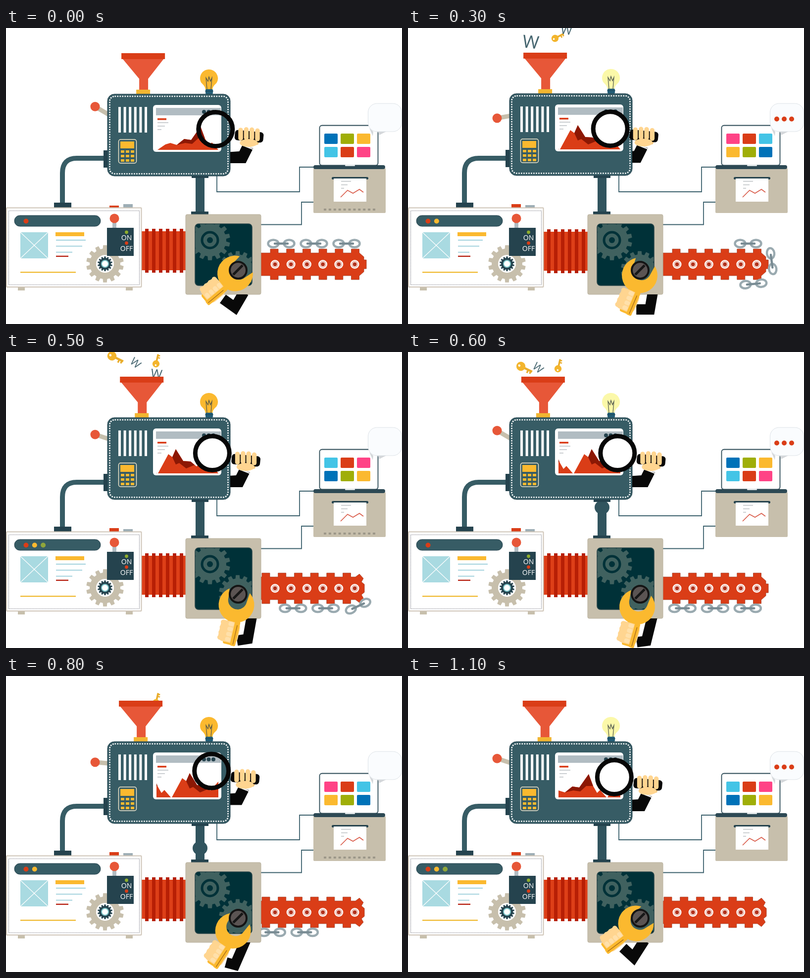
Recreate the animation shown at these times as an HTML page with a canvas. Size 800 by 600 pixels, loop 1.2 s.

```html
<!DOCTYPE html>
<html>
<head>
<meta charset="utf-8">
<style>html,body{margin:0;width:100%;height:100%;overflow:hidden;background:#fff}canvas{display:block}</style>
</head>
<body>
<canvas id="stage" width="800" height="600"></canvas>
<script>
const c = document.getElementById('stage').getContext('2d');
const TEAL = '#375c65', DARK = '#25434e', RED = '#da3d17', ORANGE = '#e75738', GOLD = '#fbb92f',
  BEIGE = '#c7bfac', NIGHT = '#003138', COG = '#40615f', SKIN = '#ffd590', PALE = '#ffe0aa', GREY = '#b1bcc2';

// ---------- drawing helpers ----------
function paint(fill, stroke, width = 1) {
  if (fill) { c.fillStyle = fill; c.fill(); }
  if (stroke) { c.strokeStyle = stroke; c.lineWidth = width; c.stroke(); }
}
function box(x, y, w, h, fill, r = 0, stroke, width) {
  c.beginPath(); c.roundRect(x, y, w, h, r); paint(fill, stroke, width);
}
function oval(x, y, rx, ry, fill, stroke, width) {
  c.beginPath(); c.ellipse(x, y, rx, ry, 0, 0, 7); paint(fill, stroke, width);
}
const disc = (x, y, r, ...style) => oval(x, y, r, r, ...style);
function trace(points, close) {
  c.beginPath();
  points.forEach(p => c.lineTo(p[0], p[1]));
  if (close) c.closePath();
}
function poly(points, fill, stroke, width) { trace(points, true); paint(fill, stroke, width); }
function line(points, stroke, width) { trace(points); paint(null, stroke, width); }
function place(x, y, angle, draw) {
  c.save(); c.translate(x, y); c.rotate(angle); draw(); c.restore();
}
function clipped(x, y, w, h, draw) {
  c.save(); c.beginPath(); c.rect(x, y, w, h); c.clip(); draw(); c.restore();
}
function dotted(x, y, w, h, r, color, width, dash) {
  c.setLineDash(dash); box(x, y, w, h, null, r, color, width); c.setLineDash([]);
}
function repeat(n, draw) { for (let i = 0; i < n; i++) draw(i); }
function gear(x, y, outer, inner, teeth, fill) {
  const pts = [];
  repeat(teeth, i => [[.18, inner], [.28, outer], [.72, outer], [.82, inner]].forEach(([o, r]) => {
    const a = (i + o) * 2 * Math.PI / teeth;
    pts.push([x + r * Math.cos(a), y + r * Math.sin(a)]);
  }));
  poly(pts, fill);
}

// ---------- motion ----------
const STEPS = 12;
const swing = (k, mid, amp, peak, period = STEPS) => mid + amp * Math.cos(2 * Math.PI * (k - peak) / period);
function along(points, k) {
  const i = points.findLastIndex(p => p[0] <= k);
  const [a, from] = points[i], [b, to] = points[i + 1];
  return from + (to - from) * (k - a) / (b - a);
}

// ---------- falling things ----------
function letter(x, y, size, angle) {
  place(x, y, angle, () => {
    c.font = `${size}px "Open Sans", sans-serif`;
    c.textAlign = 'center';
    c.fillStyle = '#45656f'; c.fillText('W', 0, size * .36);
  });
}
function key(x, y, angle, size) {
  place(x, y, angle, () => {
    c.scale(size, size);
    box(4, -2, 18, 4, '#e9ad2c');
    box(13, 1, 3, 5, '#e9ad2c'); box(18, 1, 3, 4, '#e9ad2c');
    disc(0, 0, 8, '#f3b52d');
    disc(-3, 0, 2, '#fff');
  });
}
function falling(k) {
  const a = k - 2, b = k - 5;
  clipped(0, 0, 800, 52, () => {
    if (k > 0 && k < 5) letter(248, 1 + 9 * k, 36, .1);
    if (k > 1 && k < 5) key(297, 12 + 9 * a, -.5, .9);
    if (k > 1 && k < 6) letter(322 - 2 * a * a, 5 * a * a - 1, 25, .12);
    if (k > 3 && k < 8) letter(262 + b, 22 + 10 * b, 22, .7);
    if (k > 4 && k < 8) key(214 + 14 * b, 8 + 21 * b, .45, 1.15);
    if (k > 4 && k < 9) key(303, 24 + 10 * b, -1.35, .9);
  });
}

// ---------- upper machine ----------
function funnel(k) {
  place(swing(k, 275, 3, 1.5), 0, 0, () => {
    box(-14, 125, 28, 10, '#f2b632');
    poly([[-42, 62], [42, 62], [10, 103], [10, 125], [-8, 125], [-8, 103]], ORANGE);
    box(-44, 51, 88, 12, RED);
  });
}
function bulb(lit) {
  c.beginPath();
  c.arc(410, 102, 18, 2.6, .54);
  c.bezierCurveTo(420, 117, 418, 118, 417, 125);
  c.lineTo(403, 125);
  c.bezierCurveTo(402, 118, 400, 117, 394.6, 111);
  paint(lit ? '#fbf8a9' : GOLD);
  line([[406, 124], [404, 101], [408, 108], [410, 99], [413, 108], [416, 101], [414, 124]], '#49514a', 1.2);
  box(403, 124, 15, 10, '#245f78', 2);
  line([[402, 128], [419, 128]], '#173f51', 1);
}
function lever(k) {
  const y = swing(k, 171, -12, .2, 6);
  line([[180, y], [209, 177 + (y - 171) * .05]], BEIGE, 9);
  disc(180, y, 9.5, ORANGE);
}
const RIDGE = [[306, 247], [322, 236], [332, 233], [345, 237], [360, 225], [374, 227], [393, 200],
  [402, 224], [410, 238], [416, 232], [429, 247]];
const RIDGE_SHADE = [[345, 237], [360, 225], [374, 227], [393, 200], [402, 224], [388, 224], [376, 235], [362, 233]];
const PEAKS = [[307, 247], [328, 208], [336, 214], [343, 198], [358, 222], [373, 223], [385, 233],
  [402, 214], [429, 247]];
const PEAKS_SHADE = [[336, 214], [343, 198], [358, 222], [373, 223], [381, 230], [364, 237], [350, 226], [343, 229]];
// One long strip of hills, shown at four scroll positions.
function chart(k) {
  clipped(304, 180, 125, 68, () => {
    c.translate([0, -124, -96, -28][Math.floor(k / 3)], 0);
    poly(RIDGE, RED); poly(RIDGE_SHADE, '#8c1804');
    c.translate(124, 0);
    poly(PEAKS, RED); poly(PEAKS_SHADE, '#8c1804');
  });
}
function device(k) {
  box(197, 248, 12, 35, DARK);
  box(205, 134, 248, 166, TEAL, 14, DARK, 1);
  dotted(209.5, 138.5, 239, 157, 10, '#fff', 2.6, [2.6, 2.4]);
  repeat(6, i => box(227 + i * 10.6, 160, 5, 52, '#fff'));
  box(227.5, 226, 36, 48, TEAL, 4, '#f4e9cd', 1.5);
  box(231, 230, 28, 14, GOLD);
  repeat(9, i => box(232 + i % 3 * 10, 248 + Math.floor(i / 3) * 9, 7, 5, GOLD));
  box(297, 156, 138, 95, '#fff', 6);
  box(303, 162, 131, 15, GREY);
  repeat(3, i => disc(400 + i * 9.5, 170, 4, DARK));
  box(306, 183, 18, 3.5, RED);
  repeat(3, i => box(306, 191 + i * 7, 22 - i * 7, 1.6, '#bfc3c7'));
  chart(k);
}
function magnifier(k) {
  const x = swing(k, 416, 8, .4, 6);
  const y = 205 - Math.max(0, swing(k, 0, 14, 1.55, 6));
  const clear = k < 3 || y < 200;
  clipped(453, 0, 347, 600, () => place(x, y, 0, () => {
    poly([[20, 47], [48, 45], [54, 33], [76, 39], [61, 69], [20, 69]], '#080808');
    line([[53, 32], [76, 41]], '#fff', 2);
  }));
  disc(x, y, 34.5, clear ? null : '#fff', '#070707', 9);
  place(x, y, 0, () => {
    poly([[47, 15], [92, 18], [86, 31], [70, 36], [55, 30]], '#f4c47d');
    place(39, 1, .1, () => box(1, 0, 58, 21, '#080808', 6));
    repeat(4, i => box(46 + i * 11.3, -4 + (i - 1.2) ** 2 * .8, 9.5, 26, SKIN, 5));
    oval(67, 28, 18, 8, SKIN);
  });
}

// ---------- pipes and wires ----------
function pipes(k) {
  line([[426, 298], [426, 332], [593, 332], [593, 282], [623, 282]], '#3c616d', 1.8);
  line([[514, 398.5], [597, 398.5], [597, 353], [623, 353]], '#3c616d', 1.8);
  c.beginPath(); c.moveTo(200, 264); c.lineTo(143, 264);
  c.quadraticCurveTo(114, 264, 114, 294); c.lineTo(114, 357);
  paint(null, TEAL, 10);
  box(97, 354, 35, 10, DARK);
  box(383, 300, 18, 76, '#31545e');
  if (k > 5 && k < 10) clipped(370, 300, 45, 76, () => oval(392, 332 + (k - 7) * 17, 15, 14, '#31545e'));
  box(375, 299, 34, 5, DARK);
  box(374, 372, 35, 7, DARK);
}

// ---------- laptop and printer ----------
const TILES = [['#0072b8', '#9fae08', '#fbb92f'], ['#43c4e6', '#da3d17', '#ff4386']];
function laptop(k, lit) {
  const phase = Math.floor(k / 2) % 3;
  box(633.5, 197.5, 118, 81, '#fff', 5, '#2c4a56', 1.8);
  repeat(6, i => {
    const col = i % 3, row = Math.floor(i / 3);
    const rowColors = TILES[phase ? 1 - row : row];
    box(643 + col * 33, 214 + row * 27, 27, 21, rowColors[phase === 1 ? 2 - col : col], 2);
  });
  box(621, 284, 146, 91, BEIGE, 2);
  box(621, 278, 145, 8, '#2d4954', 4);
  box(685, 277, 20, 3, '#dfe5e7', 1);
  box(658, 302, 74, 5, DARK, 3);
  box(662, 305, 66, 47, '#fff');
  repeat(3, i => box(677, 310 + i * 7, 20 - i * 7, 1.6, '#c1c5c8'));
  line([[676, 343], [690, 329], [701, 335], [714, 327], [722, 333]], '#d95a48', 1.6);
  if (!lit) repeat(11, i => box(642 + i * 9.9, 366, 5, 4, '#9c9789'));
  poly([[734, 203], [741, 219], [742, 210]], '#d4d7da');
  poly([[750, 208], [768, 210], [754, 217]], '#d4d7da');
  box(731.5, 153, 68, 57, '#fafcfe', 18, '#dde2e7', 1);
  if (lit) repeat(3, i => disc(745 + i * 15, 184.5, 5, RED));
}

// ---------- control box ----------
function controlBox(k) {
  const early = k < 3;
  box(209, early ? 360 : 357, 19, 8, RED);
  box(237, early ? 357 : 359, 19, 8, '#9eaeb5');
  box(24, 525, 14, 7, BEIGE); box(242, 525, 14, 7, BEIGE);
  box(1, 364.5, 272.5, 160.5, '#fff', 1, '#cfc5b8', 2);
  dotted(5.5, 370.5, 264, 150, 0, '#5b5b68', 1.2, [1.3, 1.7]);
  box(17, 380, 174, 22, TEAL, 11, DARK, 1);
  [RED, GOLD, '#8fa63b'].slice(0, Math.floor(k / 2) % 3 + 1)
    .forEach((color, i) => disc(40.5 + i * 17.3, 391.5, 5, color));
  box(29, 414, 56, 53, '#a9dae1');
  line([[29, 414], [85, 467]], '#fff', 1.2); line([[85, 414], [29, 467]], '#fff', 1.2);
  box(100, 414, 58, 8, GOLD);
  const cut = k % 4 === 3 ? 10 : 0;
  [60, 53, 33].forEach((w, i) => box(101, 429 + i * 12.3, w - cut, 2, '#a3d2dd'));
  box(101, 461.5, 25, 2.5, '#b9281a');
  box(29, 494, 112, 2.2, '#f0b92f');
  gear(200, 478, 38, 31, 14, BEIGE);
  disc(200, 478, 18, '#fff');
  gear(200, 478, 15, 12, 14, DARK);
  disc(200, 478, 7, '#fff', '#7cc5c9', 2);
  box(215, 390, 8, 17, GREY);
  disc(219, 386, 9.5, ORANGE);
  box(204, 405, 54, 57, DARK);
  disc(243.5, 414, 3.4, '#8fae2d'); disc(243.5, 436, 3.4, RED);
  c.fillStyle = '#fff'; c.textAlign = 'center';
  c.font = '14px "Open Sans", sans-serif';
  c.fillText('ON', 243.5, 430); c.fillText('OFF', 243.5, 452);
}
function bellows(k) {
  const y = k < 3 ? 407 : 408;
  box(274, y + 5, 89, 79, '#dd3f18');
  repeat(6, i => box(281 + i * 14, y, 7, 89, '#b71f05'));
}

// ---------- belt and chain ----------
const BELT_ENDS = [
  [[714, 456], [723, 464], [723, 470], [728, 470], [728, 479]],
  [[708, 457], [717, 451], [727, 461], [719, 468], [722, 474], [732, 475], [734, 479]],
  [[706, 456], [714, 450], [722, 459], [718, 466], [724, 471], [724, 479]]];
function belt(k) {
  const phase = k % 3, top = [[515, 456]];
  repeat(6, i => {
    const x = (phase ? 517 : 534) + i * 32.7;
    top.push([x, 456], [x, 448], [x + 16, 448], [x + 16, 456]);
  });
  top.push(...BELT_ENDS[phase]);
  const bottom = top.map(([x, y]) => [x, 958 - y]).reverse();
  poly([...top, ...bottom], RED, '#a03a24', .8);
  repeat(6, i => {
    const x = 543.5 + i * 32.2;
    disc(x, 479, 9, '#fff');
    disc(x, 479, 6, null, '#e6a08f', 1.5);
    disc(x, 479, 4, '#b3321c');
  });
}
// The chain runs along the top, around the right end and back underneath.
function onLoop(s) {
  const bend = 694, r = 41, arc = Math.PI * r;
  if (s < bend) return [s, 437, 0];
  if (s > bend + arc) return [2 * bend + arc - s, 519.5, Math.PI];
  const a = (s - bend) / r;
  return [bend + r * Math.sin(a), 478 - r * Math.cos(a), a];
}
const CHAIN_PATH = [[0, 556], [2, 598], [3, 687], [5, 805], [7, 856], [9, 971], [12, 1110]];
function chain(k) {
  const tail = along(CHAIN_PATH, k);
  clipped(500, 400, 300, 200, () => repeat(3, i => place(...onLoop(tail + i * 66), () => {
    oval(-16, 0, 10.5, 7.5, null, '#9aaab0', 4.5);
    oval(16, 0, 10.5, 7.5, null, '#9aaab0', 4.5);
    c.lineCap = 'round';
    line([[-13, 0], [13, 0]], '#788b93', 4.5);
  })));
}

// ---------- cabinet and wrench ----------
function cabinet() {
  box(363, 378, 152, 162, BEIGE, 3, '#b9b19d', 1);
  clipped(382, 397, 115, 125, () => {
    box(382, 397, 115, 125, NIGHT, 7);
    gear(412, 430, 41, 33, 14, COG);
    disc(412, 430, 16, null, NIGHT, 5);
    disc(412, 430, 6, NIGHT);
    gear(468, 490, 38, 31, 14, COG);
  });
  box(382, 397, 115, 125, null, 7, '#29464a', 1.5);
}
function wrench(k) {
  const x = swing(k, 463, 5, 3), y = swing(k, 507, 11, 7);
  const turn = swing(k, 33, 20, 11) * Math.PI / 180;
  const shoulder = [swing(k, 487, 10, 4.4), 536];
  const elbow = [swing(k, 472, 19, 4), y + 69];
  const wrist = [x - 48 * Math.sin(turn) + 12, y + 62 * Math.cos(turn) + 12];
  clipped(380, 540, 160, 60, () => line([shoulder, elbow, wrist], '#090909', 21));
  place(x, y, turn, () => {
    c.beginPath();
    c.arc(0, 0, 36, -.95, Math.PI + .95);
    c.lineTo(-19, -12);
    c.arc(0, -10, 19, Math.PI, 0, true);
    c.closePath();
    paint(GOLD);
    box(-10, 30, 24, 52, GOLD, 4);
    box(-22, 35, 40, 43, SKIN, 11);
    box(5, 32, 11, 51, GOLD, 3);
    line([[11, 40], [11, 80]], '#a66a18', 1.3);
    repeat(4, i => {
      box(-23, 35 + i * 10.5, 27, 10, SKIN, 5);
      box(-7, 36 + i * 10.5, 11, 8.5, PALE, 4);
    });
  });
  disc(469, 491, 17, '#5b5453', '#141414', 4);
  line([[459, 500], [478, 481]], '#171717', 5);
}

function draw(k) {
  c.fillStyle = '#fff'; c.fillRect(0, 0, 800, 600);
  const lit = Math.floor(k / 2) % 2 === 1;
  pipes(k);
  falling(k);
  lever(k);
  place(0, k < 3 ? 0 : -1, 0, () => { funnel(k); bulb(lit); device(k); });
  magnifier(k);
  laptop(k, lit);
  bellows(k);
  controlBox(k);
  belt(k);
  chain(k);
  cabinet();
  wrench(k);
}

const start = performance.now();
function tick() {
  draw(Math.floor((performance.now() - start) % 1200 / 100));
  requestAnimationFrame(tick);
}
tick();
</script>
</body>
</html>
```
